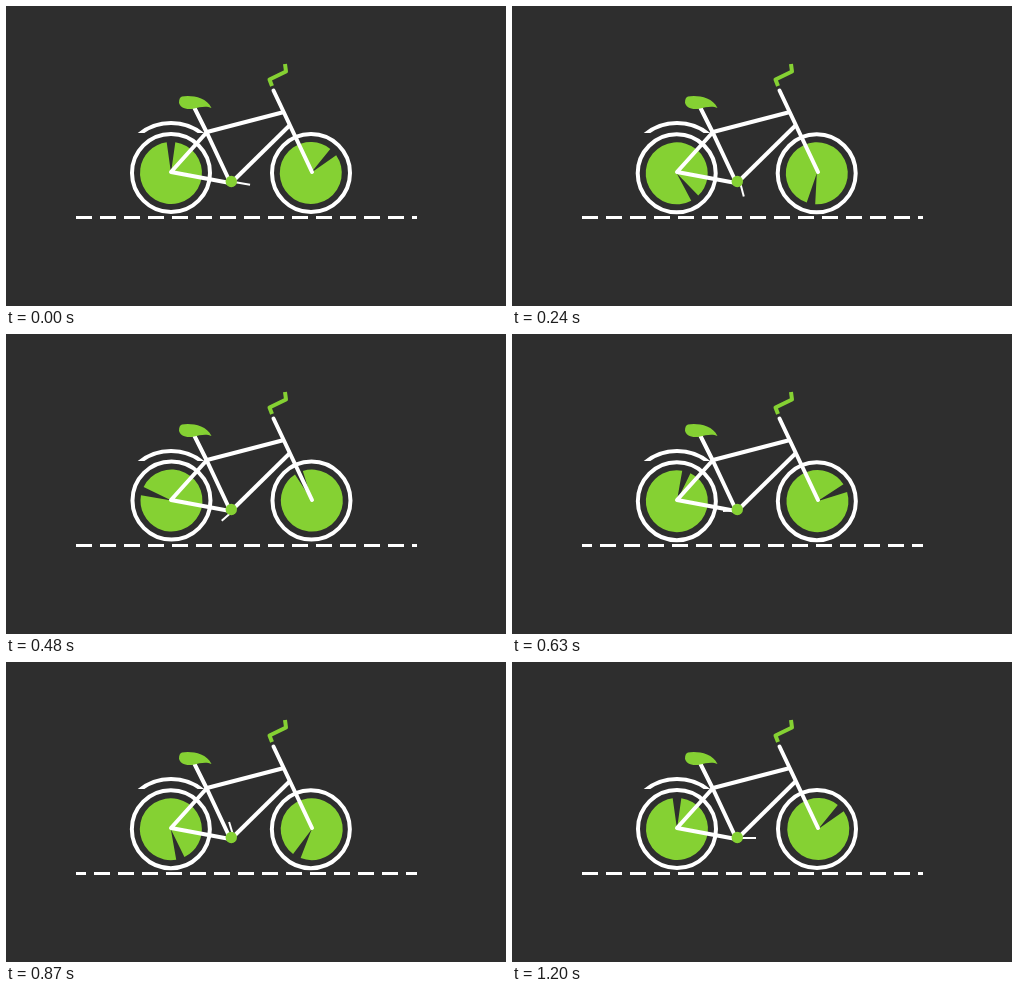
Recreate the animation shown at these times as an HTML page with a canvas. Size 500 by 300 pixels, loop 1.27 s.

```html
<!DOCTYPE html>
<html lang="en">
<head>
<meta charset="utf-8">
<title>Bicycle</title>
<style>
  html, body { margin: 0; width: 100%; height: 100%; overflow: hidden; background: #2e2e2e; }
  canvas { display: block; }
</style>
</head>
<body>
<canvas id="stage" width="500" height="300"></canvas>
<script>
const ctx = document.getElementById('stage').getContext('2d');
const BG = '#2e2e2e', WHITE = '#ffffff', GREEN = '#85d133';
const LOOP = 1270, STEP = 30, LAST = 40;
const rad = deg => deg * Math.PI / 180;

// Crank pose as [step, degrees clockwise from right, length]
const CRANK = [[0, 10, 16.3], [5, 51, 14.5], [12, 108, 15.8], [21, 177, 17],
               [29, 253, 16.8], [34, 300, 14], [40, 360, 16]];

function line(points, color, width, cap = 'butt') {
  ctx.beginPath();
  points.forEach(([x, y]) => ctx.lineTo(x, y));
  ctx.strokeStyle = color;
  ctx.lineWidth = width;
  ctx.lineCap = cap;
  ctx.lineJoin = 'round';
  ctx.stroke();
}

function disc(x, y, r, color) {
  ctx.beginPath();
  ctx.arc(x, y, r, 0, 2 * Math.PI);
  ctx.fillStyle = color;
  ctx.fill();
}

function ring(x, y, r, width) {
  ctx.beginPath();
  ctx.arc(x, y, r, 0, 2 * Math.PI);
  ctx.strokeStyle = WHITE;
  ctx.lineWidth = width;
  ctx.stroke();
}

// Disc with a narrow gap; the angle runs clockwise from the top
function notchedDisc(x, y, angle) {
  const mid = rad(angle - 90), half = rad(8);
  ctx.beginPath();
  ctx.moveTo(x, y);
  ctx.arc(x, y, 31, mid + half, mid - half + 2 * Math.PI);
  ctx.closePath();
  ctx.fillStyle = GREEN;
  ctx.fill();
}

function wheels(step) {
  const turn = step * 18;
  const sway = 0.5 * Math.sin(rad(turn));
  const y = 167 + sway;
  ring(165 - sway, y, 39, 4);
  ring(305 - sway, y, 39, 4);
  notchedDisc(165 - sway, y, turn);
  notchedDisc(304.8 + 1.5 * step / LAST - sway, y, turn + 47);
}

function road(step) {
  ctx.fillStyle = WHITE;
  for (let x = 70 - step * 6 % 24; x < 411; x += 24) {
    const left = Math.max(x, 70), right = Math.min(x + 16, 411);
    if (right > left) ctx.fillRect(left, 210, right - left, 3);
  }
}

function crank(step) {
  const i = Math.max(1, CRANK.findIndex(key => key[0] >= step));
  const [s0, a0, l0] = CRANK[i - 1], [s1, a1, l1] = CRANK[i];
  const p = (step - s0) / (s1 - s0);
  const angle = rad(a0 + (a1 - a0) * p), length = l0 + (l1 - l0) * p;
  line([[228, 176], [228 + length * Math.cos(angle), 176 + length * Math.sin(angle)]], WHITE, 2);
}

function fender() {
  ctx.save();
  ctx.beginPath();
  ctx.rect(120, 100, 80, 27);
  ctx.clip();
  ring(165, 167, 50, 4);
  ctx.restore();
}

function saddle() {
  ctx.beginPath();
  ctx.moveTo(176, 90.5);
  ctx.bezierCurveTo(183, 89, 200, 90, 205.5, 102);
  ctx.bezierCurveTo(200, 99.5, 193, 101.5, 188, 102.5);
  ctx.bezierCurveTo(180, 104.5, 173.5, 101, 173, 96.5);
  ctx.bezierCurveTo(173, 93.5, 174, 91, 176, 90.5);
  ctx.fillStyle = GREEN;
  ctx.fill();
}

function bike(step) {
  fender();
  crank(step);
  line([[188, 101], [201, 127], [224, 176]], WHITE, 4);
  line([[201, 126], [278, 106]], WHITE, 4);
  line([[225, 177], [284, 119]], WHITE, 4);
  line([[201, 126], [165, 166], [224, 177]], WHITE, 4);
  line([[267.5, 84.5], [306, 166]], WHITE, 4, 'round');
  saddle();
  line([[266, 80], [263.5, 73.5], [280, 65.5], [279, 58]], GREEN, 4);
  disc(225.3, 175.5, 5.7, GREEN);
}

function render(now) {
  const step = Math.min(LAST, Math.floor(now % LOOP / STEP));
  ctx.fillStyle = BG;
  ctx.fillRect(0, 0, 500, 300);
  road(step);
  wheels(step);
  bike(step);
}

let start;
function tick(now) {
  start ??= now;
  render(now - start);
  requestAnimationFrame(tick);
}
render(0);
requestAnimationFrame(tick);
</script>
</body>
</html>
```
